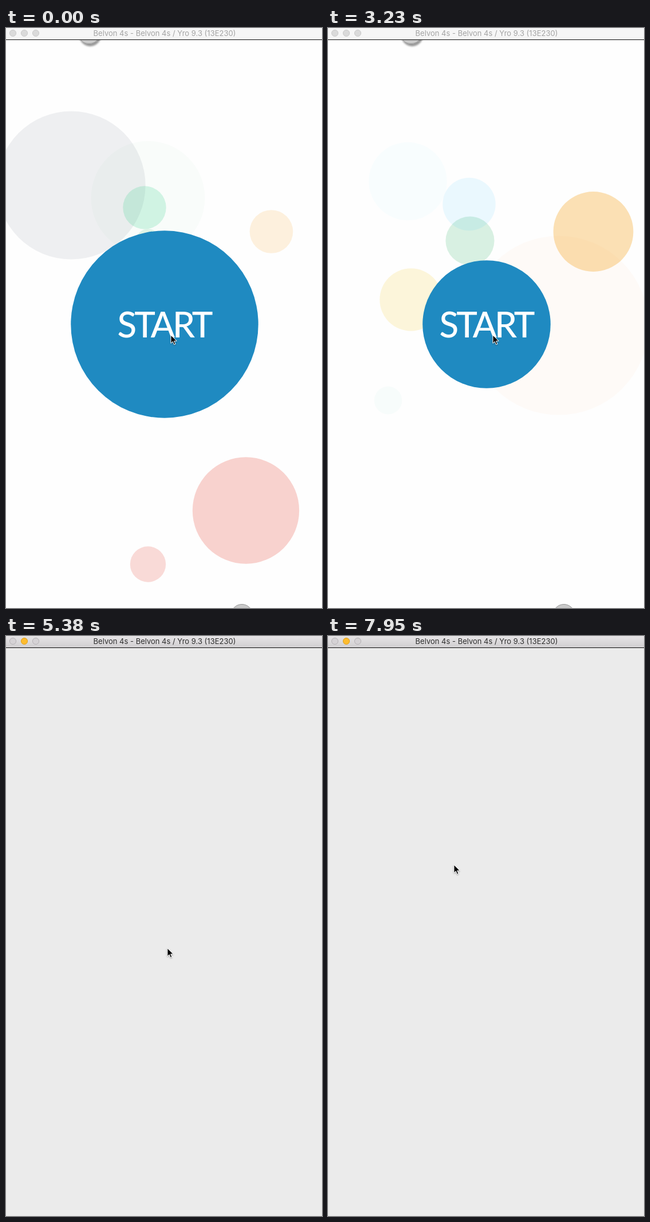
These frames come from a looping animation (552x1014 px, 8000 ms). An HTML page:

```html
<!DOCTYPE html>
<html lang="en">
<head>
<meta charset="utf-8">
<title>Start screen</title>
<style>
  html, body { margin: 0; width: 100%; height: 100%; overflow: hidden; background: #fefefe; }
  svg { display: block; width: 100%; height: 100%; }
  .start { font: 500 62px Lato, sans-serif; letter-spacing: -4px; fill: #fff; text-anchor: middle; }
  .title { font: 13px Inter, sans-serif; text-anchor: middle; fill: #a3a3a3; }
  .light { fill: #dadada; stroke: #cacaca; }
  .active .title { fill: #2e2e2e; }
  .active .light { fill: #d5d2d5; stroke: #b6b3b6; }
  .active .mid { fill: #fdbc2f; stroke: #dda124; }
  .bar { fill: #f6f6f6; }
  .active .bar { fill: url(#barFill); }
</style>
</head>
<body>
<svg viewBox="0 0 552 1014" preserveAspectRatio="none">
  <defs>
    <linearGradient id="barFill" x1="0" y1="0" x2="0" y2="1">
      <stop offset="0" stop-color="#e6e4e6"/>
      <stop offset="1" stop-color="#d1cfd1"/>
    </linearGradient>
    <filter id="soft" x="-30%" y="-30%" width="160%" height="160%">
      <feDropShadow dx="2" dy="4" stdDeviation="1.6" flood-color="#000" flood-opacity=".4"/>
    </filter>
    <filter id="cursorShade" x="-50%" y="-50%" width="200%" height="200%">
      <feDropShadow dx="0" dy="1" stdDeviation=".8" flood-color="#000" flood-opacity=".4"/>
    </filter>
  </defs>
  <rect id="page" width="552" height="1014"/>
  <g id="menu">
    <g id="bubbles"></g>
    <g id="buttons" fill="#c9c9c9" stroke="#979797" filter="url(#soft)">
      <circle cx="145" cy="8.5" r="19"/>
      <circle cx="412" cy="1026.5" r="19"/>
    </g>
  </g>
  <circle id="disc"/>
  <text id="start" class="start" x="276" y="541">START</text>
  <g id="window">
    <rect class="bar" width="552" height="20"/>
    <rect y="20" width="552" height="1" fill="#0a0a0a"/>
    <circle class="light" cx="12" cy="9" r="5.6"/>
    <circle class="light mid" cx="32" cy="9" r="5.6"/>
    <circle class="light" cx="52" cy="9" r="5.6"/>
    <text class="title" x="277" y="14">Belvon 4s - Belvon 4s / Yro 9.3 (13E230)</text>
  </g>
  <path id="cursor" d="M0 0V14.2L3.3 11.1 5.6 16.5 8 15.5 5.7 10.2H10.3Z"
        fill="#000" stroke="#fff" filter="url(#cursorShade)"/>
</svg>
<script>
// Times in seconds.
const LOOP = 8, TAP = 3.75, FILLED = 4.17, BLANK = 5.38, TAP2 = 6.2, FILLED2 = 6.93, BLANK2 = 7.95;
const BLUE = '#1f8ac1', NAVY = '#2d3f50', GREY = '#ebebeb', WHITE = '#fefefe';
const $ = id => document.getElementById(id);

function set(el, attrs) {
  for (const k in attrs) el.setAttribute(k, attrs[k]);
}

// Each bubble is born at a time, swells from r0 to r1 and fades in and out.
const bubbles = [];
function bubble(cx, cy, fill, born, r0, r1, peak, life = 3.4) {
  const el = document.createElementNS('http://www.w3.org/2000/svg', 'circle');
  set(el, { cx, cy, fill });
  $('bubbles').append(el);
  bubbles.push(t => {
    const p = clamp((t - born) / life);
    set(el, { r: r0 + (r1 - r0) * p * p, opacity: peak * Math.sin(Math.PI * p) });
  });
}

bubble(114, 275, '#34495e', -3, 100, 138, .22);
bubble(248, 297, '#27ae60', -3, 80, 105, .06);
bubble(242, 314, '#2ecc87', -.57, 36, 96, .4);
bubble(248, 372, '#27ae60', -.7, 20, 55, .3, 4.9);
bubble(463.5, 356, '#f39c12', -.61, 37, 102, .4, 5.4);
bubble(419, 843.5, '#e74c3c', -1.67, 84, 122, .245);
bubble(248, 937.5, '#e74c3c', -1.63, 13, 92, .2);
bubble(344, 465, '#2ecc87', -.42, 61, 101, .32);
bubble(403, 520, '#e67e22', 0, 32, 170, .205);
bubble(145, 475, '#f1c40f', .95, 20, 80, .22, 3);
bubble(139.5, 268, '#1ed2e6', 3, 68, 147, .12);
bubble(246.5, 308, '#00b4f8', 2.8, 45, 123, .205);
bubble(105, 651, '#16a085', 3, 24, 108, .137);

// Pointer moves: start, end, dx, dy.
const moves = [[3.46, 3.9, 0, 6], [5.3, 5.38, -6, 3], [5.38, 6.3, -59, -146], [7.84, 7.95, -3, 0]];

function clamp(p) {
  return Math.min(1, Math.max(0, p));
}

function pointer(t) {
  let x = 288, y = 537;
  for (const [from, to, dx, dy] of moves) {
    const p = clamp((t - from) / (to - from));
    x += dx * p;
    y += dy * p;
  }
  return `translate(${x} ${y})`;
}

const pulse = t => 138.5 + 29.5 * Math.cos((t - .17) / 1.95 * 2 * Math.PI);

function disc(t) {
  const menuDisc = r => ({ cx: 277, cy: 518, r, fill: BLUE });
  const tapDisc = r => ({ cx: 225, cy: 391, r, fill: NAVY });
  if (t < TAP) return menuDisc(pulse(t));
  if (t < FILLED) return menuDisc(pulse(TAP) + 415 * (t - TAP) ** 2);
  if (t < BLANK) return menuDisc(640);
  if (t < TAP2 || t >= BLANK2) return tapDisc(0);
  return tapDisc(t < FILLED2 ? 1294 * (t - TAP2) ** 2 : 760);
}

function draw(t) {
  const onMenu = t < FILLED;
  const fade = 1 - clamp((t - TAP) / .25);
  set($('page'), { fill: onMenu ? WHITE : GREY });
  set($('menu'), { visibility: onMenu ? 'visible' : 'hidden' });
  bubbles.forEach(update => update(t));
  set($('buttons'), { opacity: fade });
  set($('start'), { opacity: fade });
  set($('disc'), disc(t));
  set($('window'), { class: t >= TAP ? 'active' : '' });
  set($('cursor'), { transform: pointer(t) });
}

function tick() {
  draw(performance.now() / 1000 % LOOP);
  requestAnimationFrame(tick);
}
tick();
</script>
</body>
</html>
```
